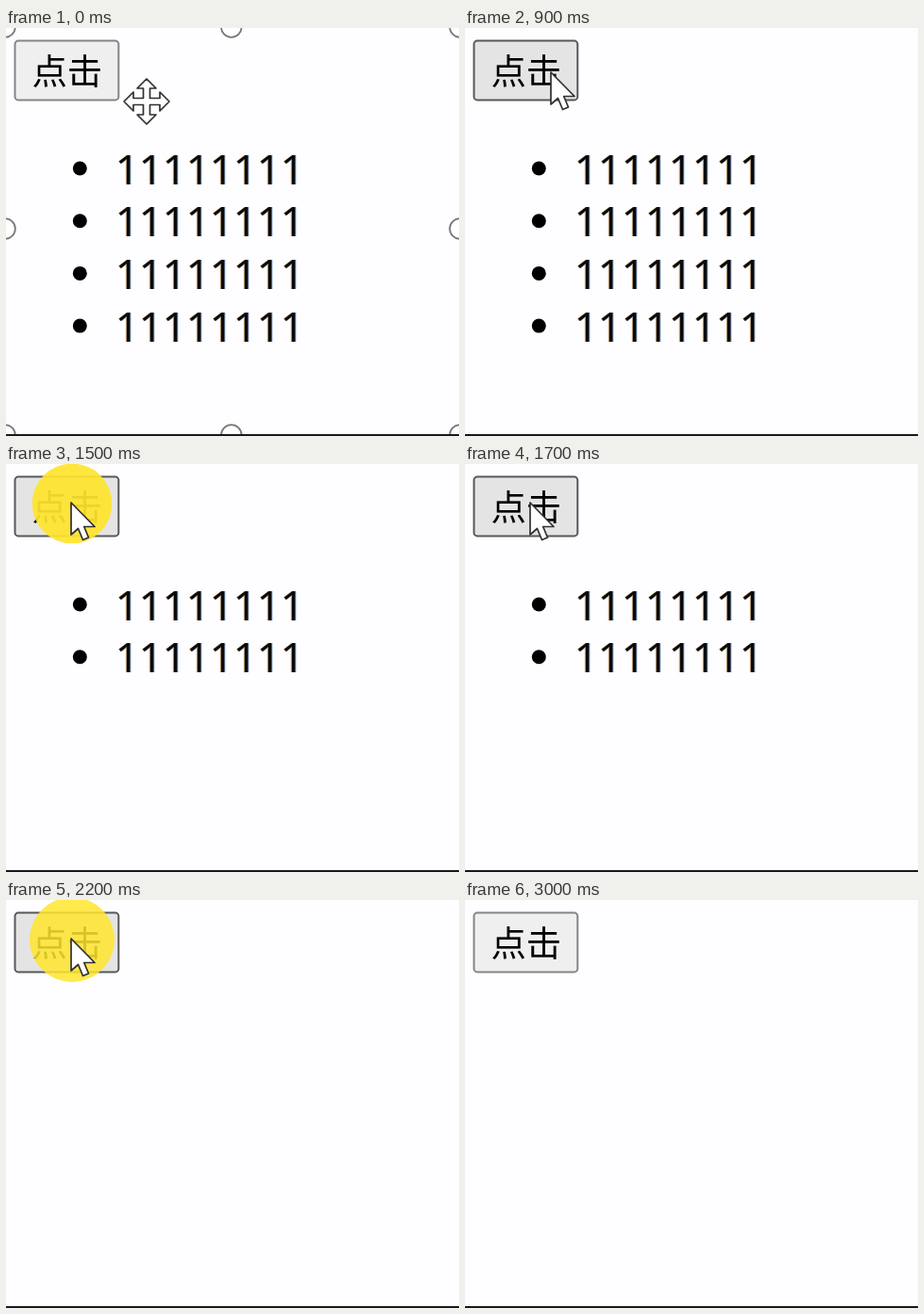
Recreate the animation shown at these times as an HTML page. Size 480 by 433 pixels, loop 3400 ms.

```html
<!DOCTYPE html>
<html lang="zh-CN">
<head>
<meta charset="utf-8">
<style>
  html, body { margin: 0; width: 100%; height: 100%; overflow: hidden; background: #fefdff; }
  svg { display: block; width: 100vw; height: 100vh; }
  .label { font: 37.4px "Noto Sans CJK SC", "Noto Sans CJK JP", sans-serif; }
  .item { font: 44.4px "Noto Sans", "Open Sans", sans-serif; letter-spacing: -0.4px; }
  .cursor { fill: #fff; stroke: #303030; stroke-width: 1.7; stroke-linejoin: round; }
</style>
</head>
<body>
<svg viewBox="0 0 480 433">
  <rect width="480" height="433" fill="#fefdff"/>
  <g id="handles" fill="#fff" stroke="#777" stroke-width="1.8"></g>
  <rect y="431" width="480" height="2" fill="#17171c"/>
  <rect id="button" x="9.5" y="13.6" width="109.8" height="62.8" rx="3.5" stroke-width="2"/>
  <text class="label" x="27.4" y="60">点击</text>
  <g id="list"></g>
  <circle id="ripple" cx="70" cy="42" fill="#ffe52e"/>
  <path id="move" class="cursor"/>
  <path id="arrow" class="cursor" d="M0 0V34L7.5 27.5 12.5 39.5 18.5 37 13.7 25.5H25Z"/>
</svg>
<script>
const LOOP = 3400, STEP = 100;
const PRESS = 80, FADE = 140;
const CLICKS = [1195, 1490, 1781, 2179];   // release times
const MOVE_PATH = [[0, 149, 78], [100, 155, 78], [200, 165, 78], [300, 174.6, 78], [400, 183, 82]];
const ARROW_PATH = [[500, 188, 95], [600, 188, 102], [900, 91, 47], [1000, 69, 41], [2400, 377, 177]];
const LEAVE = 2500;

const $ = id => document.getElementById(id);

function add(parent, tag, attrs, text = '') {
  const el = document.createElementNS('http://www.w3.org/2000/svg', tag);
  set(el, attrs);
  el.textContent = text;
  return parent.appendChild(el);
}

function set(el, attrs) {
  for (const key in attrs) el.setAttribute(key, attrs[key]);
}

function show(el, on) {
  el.style.display = on ? '' : 'none';
}

for (const cx of [-1, 238.8, 481])
  for (const cy of [-1, 213, 432])
    if (cx !== 238.8 || cy !== 213) add($('handles'), 'circle', { cx, cy, r: 10.8 });

const rows = CLICKS.map((_, i) => {
  const row = add($('list'), 'g', { transform: `translate(0 ${i * 55.7})` });
  add(row, 'circle', { cx: 78.3, cy: 149, r: 7.5 });
  // subpixel colour fringes under the black digits
  for (const [dx, fill] of [[-1, '#f5cc98'], [1, '#9cc3ee'], [0, '#0a0a0a']])
    add(row, 'text', { class: 'item', x: 115.8 + dx, y: 165.6, fill }, '11111111');
  return row;
});

// one arm of the four-way cursor, turned by quarter turns
const arm = [[-3.5, -3.5], [-3.5, -14], [-10, -14], [0, -24], [10, -14], [3.5, -14]];
const points = [0, 1, 2, 3].flatMap(turn => arm.map(([x, y]) => {
  for (let i = 0; i < turn; i++) [x, y] = [-y, x];
  return `${x} ${y}`;
}));
$('move').setAttribute('d', `M${points.join('L')}Z`);

function place(el, path, t, until) {
  const spot = path.filter(p => p[0] <= t).pop();
  show(el, spot && t < until);
  if (spot) set(el, { transform: `translate(${spot[1]} ${spot[2]})` });
}

function render(t) {
  const hover = t >= 900 && t < 2400;
  show($('handles'), t < 500);
  set($('button'), { fill: hover ? '#e4e4e4' : '#efefef', stroke: hover ? '#585858' : '#858585' });

  const gone = CLICKS.filter(c => c <= t).length;
  rows.forEach((row, i) => show(row, i < rows.length - gone));

  const click = CLICKS.find(c => t >= c - PRESS && t < c + FADE);
  show($('ripple'), click !== undefined);
  if (click !== undefined) {
    const k = Math.max(0, (t - click) / FADE);
    set($('ripple'), { r: 40 + 33 * k, opacity: 1 - k });
  }

  place($('move'), MOVE_PATH, t, 500);
  place($('arrow'), ARROW_PATH, t, LEAVE);
}

const start = performance.now();
function tick() {
  const t = (performance.now() - start) % LOOP;
  render(Math.floor(t / STEP) * STEP);
  requestAnimationFrame(tick);
}
tick();
</script>
</body>
</html>
```
